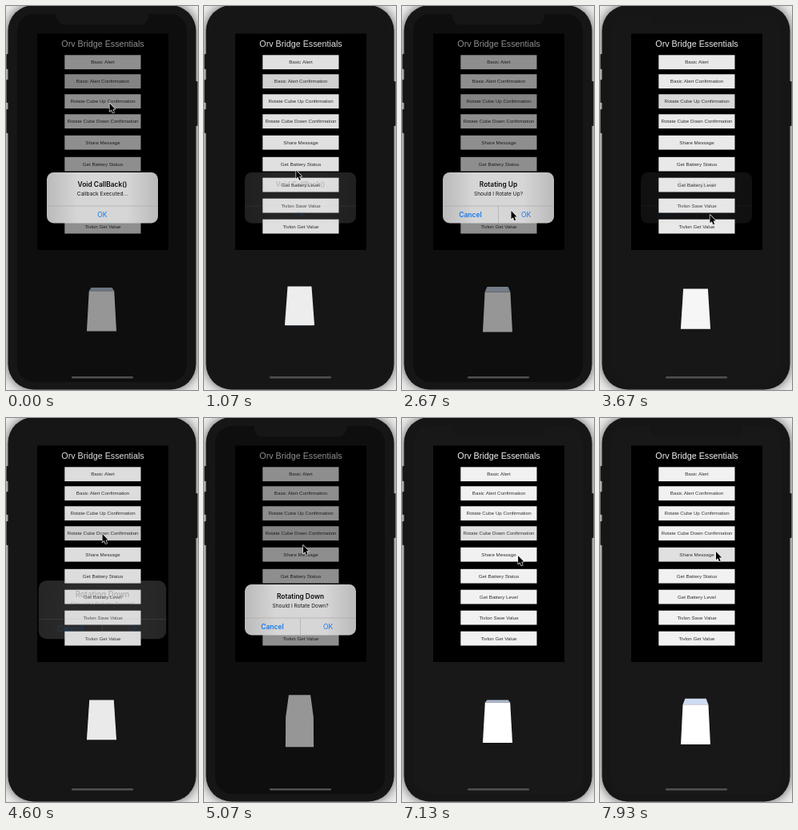
Recreate the animation shown at these times as an HTML page with a canvas. Size 240x480 px, loop 8 s.

```html
<!DOCTYPE html>
<html lang="en">
<head>
<meta charset="utf-8">
<title>Bridge demo</title>
<style>
  html, body { margin: 0; width: 100%; height: 100%; overflow: hidden; background: #eee; }
  canvas { display: block; width: 240px; height: 480px; }
</style>
</head>
<body>
<canvas id="stage"></canvas>
<script>
const W = 240, H = 480, LOOP = 8000, STEP = 1000 / 15;
const canvas = document.getElementById('stage');
const ctx = canvas.getContext('2d');
const dpr = window.devicePixelRatio || 1;
canvas.width = W * dpr;
canvas.height = H * dpr;

const SANS = '"Liberation Sans", Arial, sans-serif';
const UI = 'Inter, Roboto, sans-serif';
const BEZEL = '#161616';

// Label and vertical centre
const buttons = [
  ['Basic Alert', 70.2], ['Basic Alert Confirmation', 94.2],
  ['Rotate Cube Up Confirmation', 119.2], ['Rotate Cube Down Confirmation', 144.2],
  ['Share Message', 170.7], ['Get Battery Status', 197.7], ['Get Battery Level', 223.6],
  ['Tivlon Save Value', 249.6], ['Tivlon Get Value', 275.6]
];

// Times in seconds
const alerts = [
  { from: -1, to: 0.92, title: 'Void CallBack()', text: 'Callback Executed...', choices: ['OK'] },
  { from: 2, to: 3.49, title: 'Rotating Up', text: 'Should I Rotate Up?', choices: ['Cancel', 'OK'] },
  { from: 4.55, to: 6.05, title: 'Rotating Down', text: 'Should I Rotate Down?', choices: ['Cancel', 'OK'] }
];

// Each move: start, end, destination x and y
const cursorStart = [129, 121.5];
const cursorMoves = [
  [0.1, 0.6, 110, 260], [0.84, 1.37, 122, 121], [2.05, 2.6, 136, 256],
  [2.75, 3.1, 137, 261], [3.7, 4.3, 120, 145], [4.93, 5.55, 147.5, 257],
  [6.45, 7.25, 144.5, 167]
];

const clamp = (v, lo = 0, hi = 1) => Math.min(hi, Math.max(lo, v));
const smooth = u => u * u * (3 - 2 * u);

function roundRect(x, y, w, h, r, fill) {
  ctx.beginPath();
  ctx.roundRect(x, y, w, h, r);
  ctx.fillStyle = fill;
  ctx.fill();
}

function rect(x, y, w, h, fill) {
  ctx.fillStyle = fill;
  ctx.fillRect(x, y, w, h);
}

function label(text, x, y, font, fill) {
  ctx.font = font;
  ctx.fillStyle = fill;
  ctx.fillText(text, x, y);
}

function polygon(points, fill) {
  ctx.beginPath();
  points.forEach(([x, y]) => ctx.lineTo(x, y));
  ctx.closePath();
  ctx.fillStyle = fill;
  ctx.fill();
}

function drawBody() {
  rect(0, 0, W, H, '#eee');
  ctx.save();
  ctx.shadowColor = 'rgba(0,0,0,0.65)';
  ctx.shadowBlur = 14 * dpr;
  roundRect(2.5, -1, 235, 480.5, 32, BEZEL);
  ctx.restore();
  for (const [y, h] of [[60, 19], [92, 29], [129, 30]]) roundRect(0.5, y, 6, h, 1, BEZEL);
  roundRect(234, 94, 5.5, 56, 1, BEZEL);
  roundRect(14, 10, 212, 460, 21, '#181818');
}

function drawMenu(t) {
  rect(39, 34.5, 164, 270.5, '#000');
  label('Orv Bridge Essentials', 121, 51, `10.75px ${SANS}`, '#f2f2f2');
  const selected = t < 1.9 ? 1 : t < 4.45 ? 2 : t < 7.86 ? 3 : 4;
  buttons.forEach(([text, y], i) => {
    rect(73.3, y - 8.9, 95.2, 17.8, i === selected ? '#e0e0e0' : '#f1f1f1');
    label(text, 121, y + 2.2, `6.2px ${SANS}`, '#303030');
  });
}

// Unit cube spinning about its horizontal axis, seen from above by a wide lens
function drawCube(t) {
  const focal = 124, cy = 4.365, cz = 4.045;
  const phi = (36.2 + 100 * t + 4.5 * Math.max(0, t - 5.3)) * Math.PI / 180;
  for (let side = 0; side < 4; side++) {
    const a = phi + side * Math.PI / 2, s = Math.sin(a), c = Math.cos(a);
    const my = cy - s / 2, mz = cz - c / 2;
    if (-s * my - c * mz >= 0) continue;
    const corner = (x, v) => {
      const scale = focal / (mz - s * v);
      return [119.5 + x * scale, 240.7 + (my + c * v) * scale];
    };
    const light = 320 * Math.max(0, 0.766 * s + 0.557 * c);
    const shade = [90, 103, 125].map(ambient => Math.min(255, ambient + light));
    polygon([corner(-.5, -.5), corner(.5, -.5), corner(.5, .5), corner(-.5, .5)], `rgb(${shade})`);
  }
}

function presence(alert, t) {
  const shown = clamp((t - alert.from) / 0.25);
  const gone = clamp((t - alert.to) / 0.25);
  return shown * (1 - gone) ** 2;
}

function drawAlert(alert, t, alpha) {
  const scale = 1 + 0.2 * (1 - clamp((t - alert.from) / 0.35)) ** 2;
  const single = alert.choices.length === 1;
  ctx.save();
  ctx.globalAlpha = alpha;
  ctx.translate(120.5, 239.7);
  ctx.scale(scale, scale);
  ctx.translate(-120.5, -239.7);
  // The bright buttons behind the frosted panel shine through its middle
  const frost = ctx.createLinearGradient(51, 0, 190, 0);
  [['#bababa', 0], ['#d6d6d6', 0.28], ['#d6d6d6', 0.72], ['#bababa', 1]]
    .forEach(([color, at]) => frost.addColorStop(at, color));
  roundRect(51, 208, 139, 63.5, 8.5, frost);
  rect(51, 249.7, 139, 0.6, '#a2a2a2');
  if (!single) rect(120.2, 250, 0.6, 21.5, '#a2a2a2');
  label(alert.title, 120.5, 226.2, `600 8.4px ${UI}`, '#0c0c0c');
  label(alert.text, 120.5, 236.7, `6.6px ${UI}`, '#151515');
  alert.choices.forEach((choice, i) => {
    const weight = choice === 'Cancel' ? 600 : 400;
    label(choice, single ? 120.3 : i ? 155 : 85.5, 263.6, `${weight} 8.5px ${UI}`, '#1579ec');
  });
  ctx.restore();
}

function drawCursor(t) {
  let [x, y] = cursorStart;
  for (const [from, to, nx, ny] of cursorMoves) {
    const u = smooth(clamp((t - from) / (to - from)));
    x += (nx - x) * u;
    y += (ny - y) * u;
  }
  ctx.save();
  ctx.translate(x, y);
  const arrow = [[0.5, 0], [0.5, 10.3], [2.8, 8.2], [4.5, 12.2], [6.2, 11.5], [4.5, 7.6], [7.6, 7.4]];
  ctx.lineWidth = 1.3;
  ctx.lineJoin = 'round';
  ctx.strokeStyle = '#f4f4f4';
  polygon(arrow, '#000');
  ctx.stroke();
  polygon(arrow, '#000');
  ctx.restore();
}

function draw(ms) {
  const t = Math.floor((ms % LOOP + 5) / STEP) % 120 * STEP / 1000;
  ctx.setTransform(dpr, 0, 0, dpr, 0, 0);
  ctx.textAlign = 'center';
  drawBody();
  drawMenu(t);
  drawCube(t);
  for (const alert of alerts) {
    const alpha = presence(alert, t);
    if (!alpha) continue;
    roundRect(14, 10, 212, 460, 21, `rgba(0,0,0,${0.41 * alpha})`);
    drawAlert(alert, t, alpha);
  }
  roundRect(82, 463, 77, 2.4, 1.2, '#505050');
  roundRect(63, 8, 115, 15.5, [0, 0, 10, 10], BEZEL);
  drawCursor(t);
}

const start = performance.now();
function tick() {
  draw(performance.now() - start);
  requestAnimationFrame(tick);
}
tick();
</script>
</body>
</html>
```
